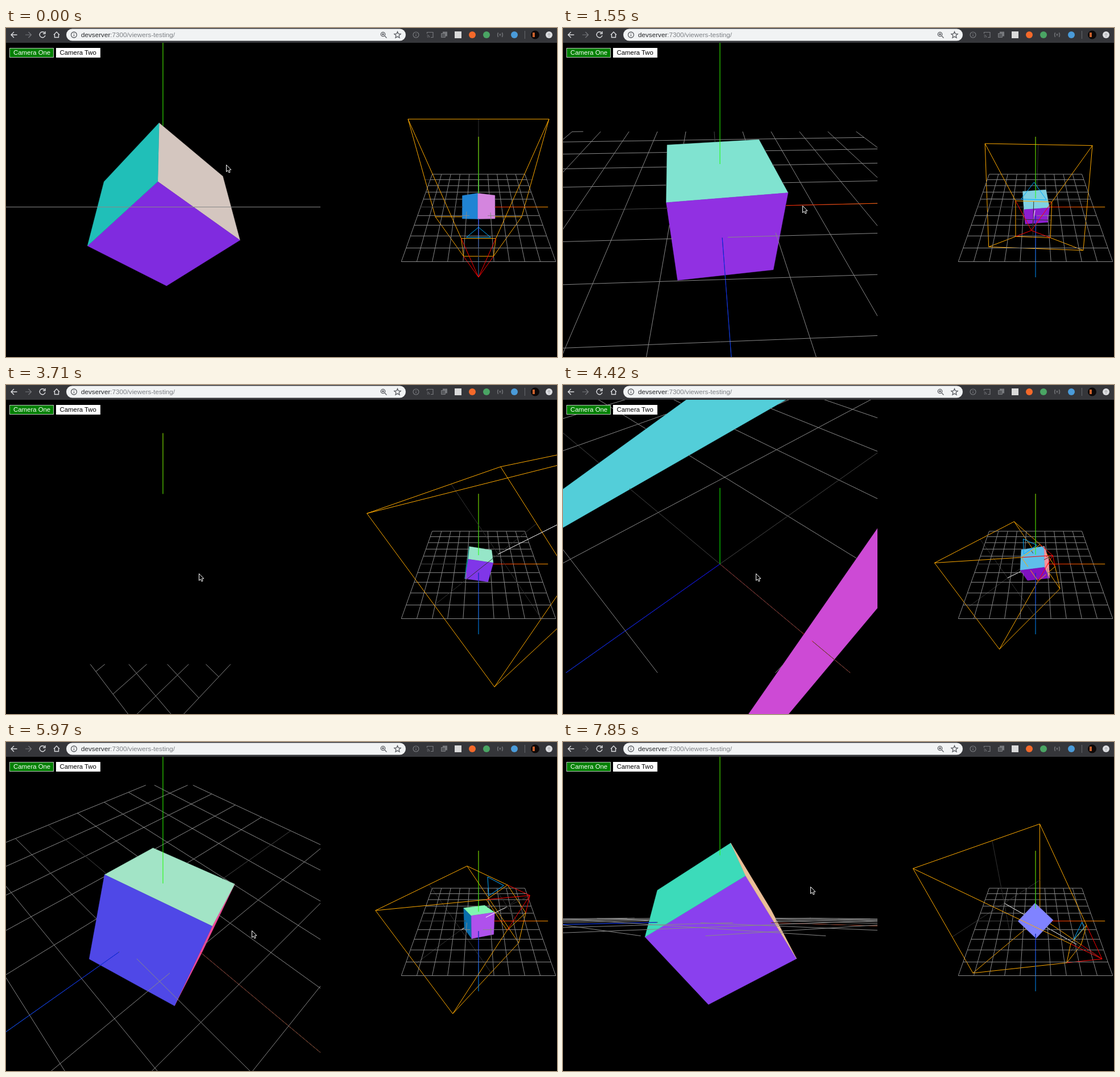
Write an HTML page with a canvas that moves like this. It is 969 px wide and 578 px high and loops after 8 s.

```html
<!DOCTYPE html>
<html lang="en">
<head>
<meta charset="utf-8">
<title>Two cameras</title>
<style>
  html, body { margin: 0; width: 969px; height: 578px; overflow: hidden; background: #000; }
  canvas, svg { position: absolute; left: 0; top: 0; display: block; }
  text { font-family: "Liberation Sans", Arial, sans-serif; font-size: 11.4px; }
  .icon { fill: none; stroke: #dcdde0; stroke-width: 1.4; }
  .dim { fill: none; stroke: #77797d; stroke-width: 1.2; }
  .ink { fill: none; stroke: #5b5e63; stroke-width: 1.3; }
</style>
</head>
<body>
<canvas id="stage" width="969" height="578"></canvas>
<svg width="969" height="578">
  <rect width="969" height="26" fill="#35363a"/>
  <path class="icon" d="M19.5 12h-10M14 7l-5 5 5 5"/>
  <path class="dim" d="M34 12h10M39.5 7l5 5-5 5"/>
  <path class="icon" d="M68 8.5a5 5 0 1 0 1 4.5M69 6v4h-4"/>
  <path class="icon" d="M84 12l5-5 5 5M85.5 11v5.5h7V11"/>
  <rect x="106" y="1.5" width="597" height="21" rx="10.5" fill="#f1f3f4"/>
  <circle class="ink" cx="119.5" cy="12" r="5"/>
  <path class="ink" d="M119.5 11.5v3M119.5 9v1.3"/>
  <text x="132" y="16" style="font-size:11.7px" fill="#27292c">devserver<tspan fill="#7d8085">:7300/viewers-testing/</tspan></text>
  <circle class="ink" cx="663" cy="11" r="3.7"/>
  <path class="ink" d="M666 14l3.5 3.5M661 11h4M663 9v4"/>
  <path class="ink" d="M688.5 6.5l1.6 3.7 4 .3-3 2.7.9 4-3.5-2.1-3.5 2.1.9-4-3-2.7 4-.3z"/>
  <circle class="dim" cx="721" cy="12" r="5"/>
  <path class="dim" d="M721 11.5v3M721 9v1.3"/>
  <path class="dim" d="M740.5 10V7.5h10.5v9h-4M740.5 12.5a4 4 0 0 1 4 4M740.5 15a1.5 1.5 0 0 1 1.5 1.5"/>
  <path d="M768 6.5h8v8h-8z" fill="#77797d"/>
  <path d="M765.5 9.5h7v7h-7z" fill="#55575b" stroke="#77797d"/>
  <rect x="789" y="6" width="12" height="12" fill="#dadada"/>
  <circle cx="820" cy="12" r="6" fill="#f4692a"/>
  <circle cx="845" cy="12" r="6" fill="#4aa564"/>
  <path class="dim" d="M865.5 8q-2 4 0 8M872.5 8q2 4 0 8M867.5 10.5l3 3M870.5 10.5l-3 3"/>
  <circle cx="894" cy="12" r="6" fill="#4a9bd9"/>
  <path d="M912.5 5v14" stroke="#66686c"/>
  <circle cx="930.5" cy="12" r="7.5" fill="#0c0808"/>
  <rect x="926" y="8" width="4" height="8" fill="#c9602c"/>
  <circle cx="955" cy="12" r="6" fill="#dcdde0"/>
  <path d="M955 15.5v-6M952.5 12l2.5-2.5 2.5 2.5" fill="none" stroke="#a5a7aa"/>
  <rect x="6.5" y="35.5" width="77" height="16" fill="#008000" stroke="#b8c4b8"/>
  <rect x="88" y="35" width="78" height="17" fill="#fff"/>
  <text x="13" y="47" fill="#fff">Camera One</text>
  <text x="94.5" y="47" fill="#000">Camera Two</text>
</svg>
<script>
const ctx = document.getElementById('stage').getContext('2d');
const LOOP = 8000, CY = 314.5, HALF = 288, ASPECT = 0.961, RAD = Math.PI / 180;
const TAN = Math.tan(30 * RAD), NEAR = 1, FAR = 5;

const dot = (a, b) => a[0] * b[0] + a[1] * b[1] + a[2] * b[2];
const mix = (a, b, k) => a.map((v, i) => v + (b[i] - v) * k);
const comb = (...terms) => [0, 1, 2].map(i => terms.reduce((s, [k, v]) => s + k * v[i], 0));
const rgb = c => `rgb(${c.map(v => Math.round(v * 255))})`;
const grey = v => [v, v, v];

// The picture updates about six times a second at a drifting pace: [count, ms]
const ticks = [0];
for (const [count, ms] of [[10, 155], [11, 163.6], [12, 178.3], [7, 158.6], [7, 178.6]])
  for (let i = 0; i < count; i++) ticks.push(ticks[ticks.length - 1] + ms);

// A value that eases through moves [from, to, target]
const track = (start, ...moves) => t => moves.reduce((value, [from, to, target]) => {
  const k = Math.min(1, Math.max(0, (t - from) / (to - from)));
  return value + (target - value) * k * k * (3 - 2 * k);
}, start);

const azimuth = track(0, [1230, 1550, -2.4], [2080, 2858, 47.4], [7000, 7840, 50]);
const elevation = track(0, [1230, 1550, 33.6], [1600, 1900, 53], [1950, 2360, 41.3],
  [2400, 2800, 50.1], [6500, 7000, -15], [7680, 7840, 1.5]);
const notches = track(0, [2850, 3690, 15], [3720, 4410, -16], [4620, 5400, 0]);
const pointerX = track(387, [150, 1080, 416], [1230, 1550, 421], [2050, 2500, 339],
  [5500, 5960, 432], [6000, 6300, 439], [6500, 7000, 435]);
const pointerY = track(240, [150, 1080, 257], [1230, 1550, 312], [1600, 1900, 342],
  [1950, 2360, 327], [2400, 2800, 331], [6500, 7000, 229], [7680, 7840, 254]);

function makeCamera(az, el, r, view) {
  const [sa, ca, se, ce] = [Math.sin(az), Math.cos(az), Math.sin(el), Math.cos(el)];
  const back = [ce * sa, se, ce * ca];
  return { ...view, back, right: [ca, 0, -sa], up: [-se * sa, ce, -se * ca], pos: back.map(v => v * r) };
}

const toView = (cam, p) => {
  const q = comb([1, p], [-1, cam.pos]);
  return [dot(q, cam.right), dot(q, cam.up), -dot(q, cam.back)];
};
const toScreen = (cam, v) => [cam.cx + cam.f * v[0] / v[2], CY - cam.f * v[1] / v[2]];

// Equal turns about x and y
function cubeAxes(angle) {
  const c = Math.cos(angle), s = Math.sin(angle);
  return [[c, s * s, -s * c], [0, c, s], [s, -s * c, c * c]];
}

function clipPoly(poly, limit, sign) {
  const out = [];
  poly.forEach((a, i) => {
    const b = poly[(i + 1) % poly.length];
    const da = sign * (a[2] - limit), db = sign * (b[2] - limit);
    if (da >= 0) out.push(a);
    if (da * db < 0) out.push(mix(a, b, da / (da - db)));
  });
  return out;
}

function drawCube(cam, axes) {
  for (let i = 0; i < 3; i++) for (const sign of [-1, 1]) {
    const n = axes[i].map(v => v * sign), u = axes[(i + 1) % 3], w = axes[(i + 2) % 3];
    if (dot(n, cam.pos) < 0.5) continue;
    let poly = [[1, 1], [-1, 1], [-1, -1], [1, -1]]
      .map(([a, b]) => toView(cam, comb([0.5, n], [a / 2, u], [b / 2, w])));
    poly = clipPoly(clipPoly(poly, cam.near, 1), cam.far, -1);
    if (poly.length < 3) continue;
    ctx.beginPath();
    poly.forEach(v => ctx.lineTo(...toScreen(cam, v)));
    ctx.closePath();
    ctx.fillStyle = ctx.strokeStyle = rgb([cam.right, cam.up, cam.back].map(a => dot(n, a) / 2 + 0.5));
    ctx.lineWidth = 0.5;
    ctx.fill();
    ctx.stroke();
  }
}

// True when a front face of the cube lies between the camera and the point
function hidden(cam, axes, p, depth) {
  const ray = comb([1, p], [-1, cam.pos]);
  let enter = -Infinity, leave = Infinity;
  for (const a of axes) {
    const o = dot(cam.pos, a), d = dot(ray, a) || 1e-9;
    const t1 = (-0.5 - o) / d, t2 = (0.5 - o) / d;
    enter = Math.max(enter, Math.min(t1, t2));
    leave = Math.min(leave, Math.max(t1, t2));
  }
  return enter < leave && enter > 0 && enter < 0.9999 && depth * enter > cam.near;
}

function drawLine(cam, axes, { a, b, from, to = from }) {
  const za = toView(cam, a)[2], zb = toView(cam, b)[2], dz = zb - za;
  let lo = 0, hi = 1;
  for (const [limit, sign] of [[cam.near, 1], [cam.far, -1]]) {
    const da = sign * (za - limit), db = sign * (zb - limit);
    if (da < 0 && db < 0) return;
    if (da < 0) lo = Math.max(lo, (limit - za) / dz);
    if (db < 0) hi = Math.min(hi, (limit - za) / dz);
  }
  if (lo >= hi) return;
  const N = 200, at = i => lo + (hi - lo) * i / N;
  let start = -1;
  for (let i = 0; i <= N; i++) {
    const k = at(i + 0.5);
    const visible = i < N && !hidden(cam, axes, mix(a, b, k), za + dz * k);
    if (visible && start < 0) start = i;
    if (visible || start < 0) continue;
    const k0 = at(start), k1 = at(i);
    const p = toScreen(cam, toView(cam, mix(a, b, k0))), q = toScreen(cam, toView(cam, mix(a, b, k1)));
    const paint = ctx.createLinearGradient(...p, ...q);
    paint.addColorStop(0, rgb(mix(from, to, k0)));
    paint.addColorStop(1, rgb(mix(from, to, k1)));
    ctx.strokeStyle = from === to ? rgb(from) : paint;
    ctx.lineWidth = 1;
    ctx.beginPath();
    ctx.moveTo(...p);
    ctx.lineTo(...q);
    ctx.stroke();
    start = -1;
  }
}

const grid = [];
for (let i = -5; i <= 5; i++) {
  const s = i / 2, from = grey(i ? 0.533 : 0.267);
  grid.push({ a: [s, 0, -2.5], b: [s, 0, 2.5], from }, { a: [-2.5, 0, s], b: [2.5, 0, s], from });
}
// The anchor decides the drawing order where an axis coincides with a grid line
const origin = [0, 0, 0];
const axisLines = [
  { a: origin, b: [3, 0, 0], from: [1, 0, 0], to: [1, 0.6, 0], anchor: [-0.2, 0.02, 0.02] },
  { a: origin, b: [0, 3, 0], from: [0, 1, 0], to: [0.6, 1, 0], anchor: [0, 0.1, 0.1] },
  { a: origin, b: [0, 0, 3], from: [0, 0, 1], to: [0, 0.6, 1], anchor: [0, 0.1, 0.1] }
];

function frustumLines(cam) {
  const at = (x, y, d) => comb([1, cam.pos], [-d, cam.back], [x * d * TAN * ASPECT, cam.right], [y * d * TAN, cam.up]);
  const orange = [1, 0.667, 0], red = [1, 0, 0], blue = [0, 0.667, 1], dark = grey(0.2);
  const corners = [[-1, -1], [1, -1], [1, 1], [-1, 1]], lines = [];
  const add = (a, b, from) => lines.push({ a, b, from });
  add(cam.pos, at(0, 0, NEAR), dark);
  for (const d of [NEAR, FAR]) {
    add(at(-1, 0, d), at(1, 0, d), dark);
    add(at(0, -1, d), at(0, 1, d), dark);
  }
  corners.forEach((c, i) => {
    const next = corners[(i + 1) % 4];
    for (const d of [NEAR, FAR]) add(at(...c, d), at(...next, d), orange);
    add(at(...c, NEAR), at(...c, FAR), orange);
    add(cam.pos, at(...c, NEAR), red);
  });
  const tri = [[0.7, 1.1], [-0.7, 1.1], [0, 2]].map(c => at(...c, NEAR));
  tri.forEach((p, i) => add(p, tri[(i + 1) % 3], blue));
  add(at(0, 0, NEAR), at(0, 0, FAR), grey(1));
  return lines;
}

function drawView(cam, axes, extra) {
  ctx.save();
  ctx.beginPath();
  ctx.rect(cam.left, 26, cam.width, 552);
  ctx.clip();
  drawCube(cam, axes);
  const depth = l => toView(cam, l.anchor || mix(l.a, l.b, 0.5))[2];
  [...extra, ...grid, ...axisLines]
    .sort((p, q) => depth(q) - depth(p))
    .forEach(l => drawLine(cam, axes, l));
  ctx.restore();
}

const arrow = new Path2D('M.5.5v12l2.7-2.4 1.9 4 2-.9-1.8-3.9 3.6-.2z');
function drawPointer(x, y) {
  ctx.save();
  ctx.translate(x, y);
  ctx.fillStyle = '#000';
  ctx.strokeStyle = '#fff';
  ctx.lineWidth = 1;
  ctx.fill(arrow);
  ctx.stroke(arrow);
  ctx.restore();
}

const mainView = { cx: 276, f: HALF / TAN, near: NEAR, far: FAR, left: 0, width: 553 };
const sideView = { cx: 831, f: HALF, near: 0.1, far: 100, left: 553, width: 416 };
const observer = makeCamera(0, 45 * RAD, Math.hypot(5, 5), sideView);

function draw(t) {
  const cam = makeCamera(azimuth(t) * RAD, elevation(t) * RAD, 3 * 0.95 ** -notches(t), mainView);
  const axes = cubeAxes((311.8 + 34.6 * t / 1000) * RAD);
  ctx.fillStyle = '#000';
  ctx.fillRect(0, 0, 969, 578);
  drawView(cam, axes, []);
  drawView(observer, axes, frustumLines(cam));
  drawPointer(pointerX(t), pointerY(t));
}

let drawn = -1;
function loop() {
  const now = performance.now() % LOOP;
  const tick = ticks.filter(t => t <= now + 12).pop();
  if (tick !== drawn) draw(drawn = tick);
  requestAnimationFrame(loop);
}
loop();
</script>
</body>
</html>
```
